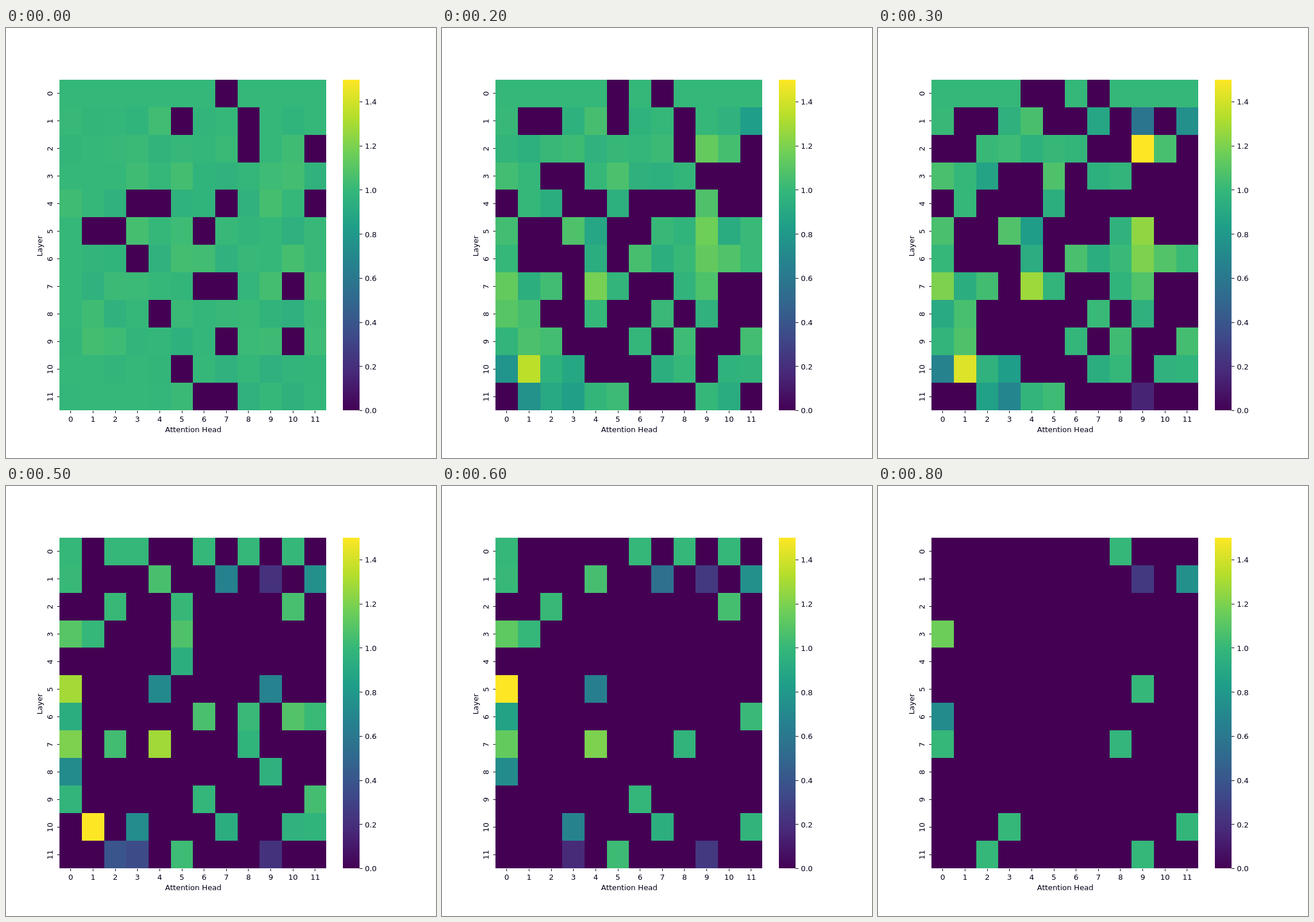
An HTML page that plays this animation: 748x748 px, repeating every 0.9 s.

```html
<!DOCTYPE html>
<html lang="en">
<head>
<meta charset="utf-8">
<title>Attention head heatmap</title>
<style>
  html, body { margin: 0; width: 100%; height: 100%; overflow: hidden; background: #fff; }
  svg { display: block; width: 100vw; height: 100vh; }
  text { font: 12.99px "DejaVu Sans", sans-serif; fill: #000018; }
  line { stroke: #000018; stroke-width: 1; shape-rendering: crispEdges; }
  rect { shape-rendering: crispEdges; }
</style>
</head>
<body>
<svg id="chart" viewBox="0 0 748 748"></svg>
<script>
const SIZE = 12, STEPS = 9, STEP_MS = 100, MAX = 1.5;
const map = { left: 93.4, top: 89.68, right: 557.26, bottom: 665.08 };
const bar = { left: 586.2, right: 615.1 };
const viridis = ['440154', '482878', '3e4989', '31688e', '26828e', '1f9e89', '35b779', '6ece58', 'b5de2b', 'fde725'];
const svg = document.getElementById('chart');

// Step at which each head is pruned, by layer; 9 means it survives.
const life = [
  [8, 5, 6, 6, 3, 2, 7, 0, 9, 5, 8, 4],
  [7, 2, 1, 4, 7, 0, 3, 8, 0, 9, 3, 9],
  [3, 5, 8, 4, 4, 6, 4, 3, 0, 4, 7, 0],
  [9, 7, 4, 1, 5, 6, 3, 5, 4, 2, 2, 1],
  [2, 4, 3, 0, 0, 6, 1, 0, 2, 3, 1, 0],
  [8, 0, 0, 5, 7, 2, 0, 3, 5, 9, 3, 3],
  [9, 1, 2, 0, 4, 2, 6, 5, 6, 5, 6, 7],
  [9, 5, 6, 2, 7, 4, 0, 0, 9, 4, 0, 1],
  [8, 5, 1, 2, 3, 1, 2, 4, 2, 6, 1, 2],
  [6, 5, 3, 2, 1, 2, 7, 0, 5, 1, 0, 6],
  [4, 6, 4, 9, 1, 0, 2, 8, 4, 2, 6, 9],
  [1, 3, 9, 7, 4, 8, 0, 0, 2, 9, 3, 2]
];

// Heads with a strong course of their own: "layer,head" and its key points, step: value.
const courses = {
  '1,7': { 2: 1, 6: .55 },
  '1,9': { 2: 1, 4: .17, 6: .25 },
  '1,11': { 3: .75 },
  '2,1': { 2: .95, 3: 0, 4: .96 },
  '2,9': { 2: 1.14, 3: 1.5 },
  '3,0': { 8: 1.16 },
  '3,2': { 1: 1, 2: 0, 3: .87 },
  '3,4': { 2: 1, 3: 0, 4: .93 },
  '5,0': { 4: 1.08, 6: 1.5 },
  '5,4': { 6: .65 },
  '5,9': { 4: 1.33, 6: 0, 8: 1 },
  '6,0': { 4: 1, 8: .72 },
  '6,9': { 3: 1.2 },
  '7,0': { 4: 1.27, 8: 1 },
  '7,4': { 4: 1.37, 6: 1.2 },
  '8,0': { 2: 1.1, 4: .72 },
  '8,4': { 0: 0, 1: 1 },
  '10,0': { 3: .67 },
  '10,1': { 2: 1.35, 4: 1.5 },
  '10,3': { 6: .67, 8: 1 },
  '11,1': { 2: .76 },
  '11,2': { 4: .8, 6: 0, 8: 1 },
  '11,3': { 2: .85, 6: .18 },
  '11,9': { 2: 1, 3: .15, 6: .25, 8: 1 }
};

function interpolate(keys, step) {
  const points = Object.entries({ 0: 1, ...keys }).map(([s, v]) => [Number(s), v]);
  const next = points.findIndex(([s]) => s >= step);
  if (next < 0) return points.at(-1)[1];
  if (next === 0) return points[0][1];
  const [s0, v0] = points[next - 1], [s1, v1] = points[next];
  return v0 + (v1 - v0) * (step - s0) / (s1 - s0);
}

function random(seed) {
  const x = Math.sin(seed * 12.9898 + 4.1) * 43758.5453;
  return x - Math.floor(x);
}

// Other live heads wander a little around 1, most in mid-loop; the first layer stays at 1.
function valueAt(step, r, c) {
  if (step >= life[r][c]) return 0;
  const course = courses[`${r},${c}`];
  if (course) return interpolate(course, step);
  const spread = r ? .1 + .08 * Math.sin(Math.PI * step / (STEPS - 1)) : 0;
  return 1 + (random(r * SIZE + c) - .5) * spread;
}

function color(value) {
  const pos = Math.min(value / MAX, 1) * (viridis.length - 1);
  const i = Math.min(Math.floor(pos), viridis.length - 2);
  const channel = (hex, k) => parseInt(hex.slice(2 * k, 2 * k + 2), 16);
  const mix = k => Math.round(channel(viridis[i], k) * (1 - pos + i) + channel(viridis[i + 1], k) * (pos - i));
  return `rgb(${[0, 1, 2].map(mix)})`;
}

function add(tag, attrs, content = '', parent = svg) {
  const node = document.createElementNS('http://www.w3.org/2000/svg', tag);
  for (const key in attrs) node.setAttribute(key, attrs[key]);
  node.textContent = content;
  return parent.appendChild(node);
}

function box(x0, y0, x1, y1, fill) {
  const [l, t, r, b] = [x0, y0, x1, y1].map(Math.round);
  return add('rect', { x: l, y: t, width: r - l, height: b - t, fill });
}

const label = (x, y, content, anchor = 'middle') => add('text', { x, y, 'text-anchor': anchor }, content);
const upright = (x, y, content) =>
  add('text', { transform: `translate(${x} ${y}) rotate(-90)`, 'text-anchor': 'middle' }, content);
const tick = (x1, y1, x2, y2) => add('line', { x1, y1, x2, y2 });

const xAt = c => map.left + c * (map.right - map.left) / SIZE;
const yAt = r => map.top + r * (map.bottom - map.top) / SIZE;
const snap = v => Math.floor(v) + .5;

for (let r = 0; r < SIZE; r++) {
  for (let c = 0; c < SIZE; c++) {
    const fills = Array.from({ length: STEPS }, (_, s) => color(valueAt(s, r, c)));
    const cell = box(xAt(c), yAt(r), xAt(c + 1), yAt(r + 1), fills[0]);
    const frames = fills.map((fill, s) => ({ fill, offset: s / STEPS, easing: 'step-end' }));
    frames.push({ fill: fills[STEPS - 1], offset: 1 });
    cell.animate(frames, { duration: STEPS * STEP_MS, iterations: Infinity });
  }
}

for (let i = 0; i < SIZE; i++) {
  const x = xAt(i + .5), y = yAt(i + .5);
  tick(snap(x), 666, snap(x), 670);
  label(x, 685.3, i);
  tick(89, snap(y), 93, snap(y));
  upright(81.2, y + .5, i);
}
label((map.left + map.right) / 2 + .5, 703, 'Attention Head');
upright(63, 379.3, 'Layer');

const gradient = add('linearGradient', { id: 'scale', x1: 0, y1: 1, x2: 0, y2: 0 });
viridis.forEach((hex, i) =>
  add('stop', { offset: i / (viridis.length - 1), 'stop-color': '#' + hex }, '', gradient));
box(bar.left, map.top, bar.right, map.bottom, 'url(#scale)');
for (let i = 0; i <= 7; i++) {
  const value = i / 5, y = map.bottom + .4 - value / MAX * (map.bottom - map.top);
  tick(615, snap(y), 620, snap(y));
  label(624.2, y + 4.9, value.toFixed(1), 'start');
}
</script>
</body>
</html>
```
